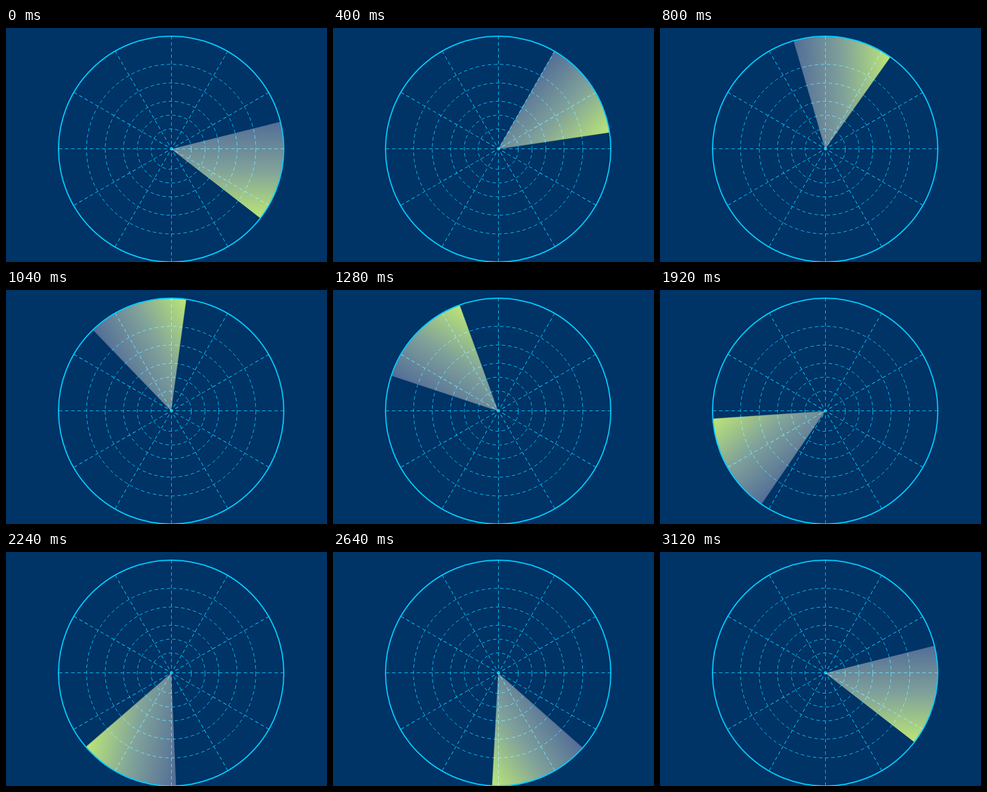
An HTML page that plays this animation: 550 px wide and 400 px high, repeating every 3.2 s.

```html
<!DOCTYPE html>
<html lang="en">
<head>
<meta charset="utf-8">
<title>Radar sweep</title>
<style>
  html, body { margin: 0; width: 100%; height: 100%; overflow: hidden; background: #036; }
  svg { display: block; width: 550px; height: 400px; }
  .grid { fill: none; stroke: #0cf; stroke-width: 1; stroke-dasharray: 6 4.556; }
  .rim { fill: none; stroke: #0cf; stroke-width: 2; }
  .sweep {
    fill: url(#beam);
    mix-blend-mode: screen;
    transform-origin: 283px 207px;
    animation: turn 3200ms infinite;
  }
  /* 39 steps of 80 ms, then the last pose holds for one more */
  @keyframes turn {
    0% { transform: rotate(0deg); animation-timing-function: steps(39, end); }
    97.5%, 100% { transform: rotate(-360deg); }
  }
</style>
</head>
<body>
<svg viewBox="0 0 550 400">
  <defs>
    <linearGradient id="beam" gradientUnits="userSpaceOnUse" x1="0" y1="160" x2="0" y2="325">
      <stop offset="0" stop-color="rgb(82,72,82)"/>
      <stop offset=".5" stop-color="rgb(128,138,86)"/>
      <stop offset="1" stop-color="rgb(188,224,28)"/>
    </linearGradient>
    <path id="spoke" d="M-193 0H193"/>
  </defs>
  <rect width="550" height="400" fill="#036"/>
  <g class="grid" transform="translate(283 207)">
    <circle r="34.5"/>
    <circle r="58"/>
    <circle r="81.7"/>
    <circle r="113"/>
    <circle r="145"/>
  </g>
  <g class="grid" transform="translate(283.5 206.5)">
    <use href="#spoke"/>
    <use href="#spoke" transform="rotate(30)"/>
    <use href="#spoke" transform="rotate(60)"/>
    <use href="#spoke" transform="rotate(90)"/>
    <use href="#spoke" transform="rotate(120)"/>
    <use href="#spoke" transform="rotate(150)"/>
  </g>
  <path class="sweep" d="M283 207L470.2 160.2A193 193 0 0 1 435.7 325Z"/>
  <circle class="rim" cx="283" cy="207" r="193"/>
</svg>
</body>
</html>
```
